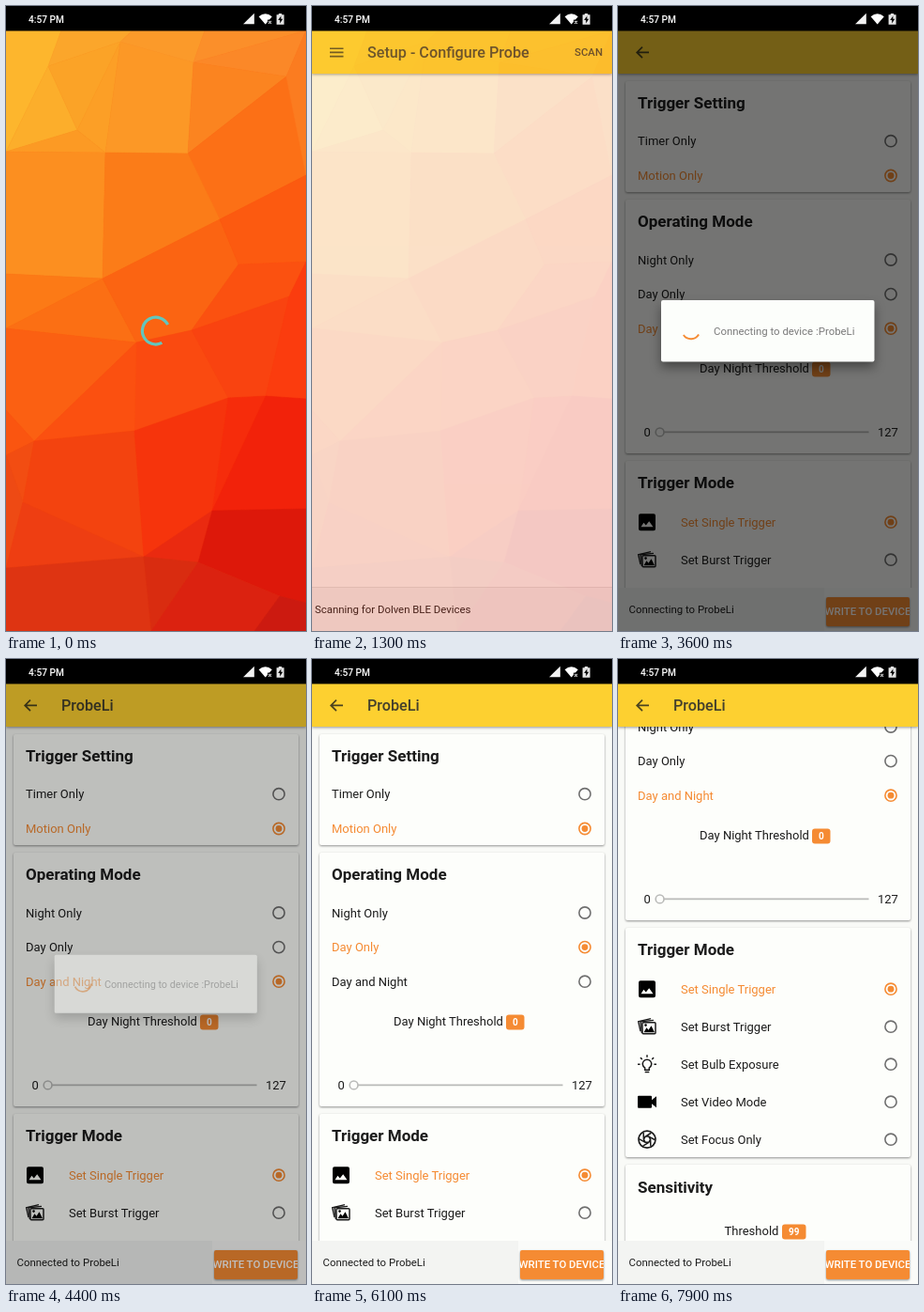
An HTML page that plays this animation: 320x665 px, repeating every 8 s.

```html
<!DOCTYPE html>
<html lang="en">
<head>
<meta charset="utf-8">
<title>Device setup</title>
<style>
  html, body { margin: 0; width: 100%; height: 100%; overflow: hidden; background: #000; }
  svg { display: block; width: 320px; height: 665px; }
  text { font-family: Roboto, "Noto Sans", sans-serif; white-space: pre; }
  .card { fill: #fdfefb; filter: drop-shadow(0 1px 1.2px rgba(0, 0, 0, .42)); }
  .bar { fill: #fdd030; filter: drop-shadow(0 1px 1.5px rgba(0, 0, 0, .4)); }
  .row { color: #6f6f6f; }
  .row text { fill: #1c1c1c; }
  .row.on { color: #f58b33; }
  .row.on text { fill: #f58b33; }
  .row .dot { display: none; }
  .row.on .dot { display: inline; }
  #box { filter: drop-shadow(0 6px 6px rgba(0, 0, 0, .4)); }
</style>
</head>
<body>
<svg id="stage" viewBox="0 0 320 665" xmlns="http://www.w3.org/2000/svg"></svg>
<script>
const LOOP = 8000, FRAME = 100;
const ORANGE = '#f58b33', INK = '#1c1c1c', DIM = '#4b431f';
const MAKER = 'Dolven', KIT = 'Probe', DEVICE = 'ProbeLi';

// ---- drawing helpers ----
const text = (x, y, s, size = 13, o = {}) =>
  `<text x="${x}" y="${y + size * .355}" font-size="${size}" font-weight="${o.w || 400}" ` +
  `fill="${o.fill || INK}" text-anchor="${o.anchor || 'start'}" id="${o.id || ''}">${s}</text>`;
const rect = (x, y, w, h, fill, extra = '') =>
  `<rect x="${x}" y="${y}" width="${w}" height="${h}" fill="${fill}" ${extra}/>`;
const path = (d, extra = '') => `<path d="${d}" ${extra}/>`;
const line = (d, color, w) => path(d, `fill="none" stroke="${color}" stroke-width="${w}"`);
const card = (y, h) => `<rect class="card" x="8" y="${y}" width="304" height="${h}" rx="2"/>`;
const heading = (y, s) => text(21, y, s, 17, { w: 700 });
const chip = (x, y, w, s) => rect(x, y - 8, w, 16, ORANGE, 'rx="3"') +
  text(x + w / 2, y, s, 10, { w: 700, fill: '#fff', anchor: 'middle' });
const row = (y, s, o = {}) => `<g class="row ${o.on ? 'on' : ''}" id="${o.id || ''}">` +
  `<text x="${o.x || 21}" y="${y + 4.6}" font-size="13">${s}</text>` +
  `<circle cx="291" cy="${y}" r="6.1" fill="none" stroke="currentColor" stroke-width="1.6"/>` +
  `<circle class="dot" cx="291" cy="${y}" r="3.4" fill="currentColor"/></g>`;
const icon = (y, s) => `<g transform="translate(31 ${y})">${s}</g>`;
const polar = (r, deg) => {
  const a = deg * Math.PI / 180;
  return `${(r * Math.cos(a)).toFixed(2)} ${(r * Math.sin(a)).toFixed(2)}`;
};
const arc = (r, from, sweep) =>
  `M${polar(r, from)}A${r} ${r} 0 ${sweep > 180 ? 1 : 0} 1 ${polar(r, from + Math.max(sweep, .5))}`;

// ---- faceted backdrop ----
const points = {
  a: [0, 26], R: [59, 26], b: [45, 64], c: [122, 38], d: [135, 26], e: [200, 60], f: [212, 26],
  g: [320, 26], h: [299, 75], i: [0, 155], j: [76, 132], k: [106, 156], l: [194, 157], m: [320, 180],
  n: [228, 227], o: [103, 290], p: [0, 285], q: [248, 275], r: [0, 343], s: [139, 358], t: [198, 345],
  u: [302, 309], v: [320, 272], w: [237, 417], x: [277, 415], y: [320, 418], z: [137, 452],
  A: [30, 463], B: [0, 430], C: [18, 528], D: [147, 586], E: [220, 537], G: [0, 598], H: [155, 665],
  I: [205, 592], J: [292, 628], K: [0, 665], L: [320, 665], M: [0, 478], N: [265, 665],
  O: [320, 535], Q: [320, 635]
};
const facets = ('aRbi:fdb62d bji:fcae2b Rdcb:fba62b bcj:fba327 cjk:fc9f26 ijk:fc9a24 celk:fc9826 ' +
  'dfec:fb9a2a fge:fb8f2a egh:fb8828 ehl:fb8420 hmnl:fc7016 ghm:fb7c20 ikop:fc8f20 klno:fb7c18 ' +
  'por:fc7a16 osr:fb6f14 onqts:fb6412 nmvq:fc5a10 qvut:fb5110 rsAB:fb6012 stwz:fa4a10 tuxw:f94310 ' +
  'uvyx:fb3c0e szA:fb5010 BAM:fa5510 MAC:f24d12 AzDC:f3430f zwED:f6340c wxE:f62c0b xyOE:f2220a ' +
  'MCG:ee4a14 CDG:ee3e12 GDHK:de3412 DEI:ea2a10 DIH:d92c10 EOQJI:dd180a IJNH:db2210 JQLN:cc1a10')
  .split(' ').map(f => {
    const [ids, hex] = f.split(':');
    const pts = [...ids].map(k => points[k].join()).join(' ');
    return `<polygon points="${pts}" fill="#${hex}" stroke="#${hex}" stroke-width=".6"/>`;
  }).join('');

// ---- icons ----
const photo = path('M-7 -9H7Q9 -9 9 -7V7Q9 9 7 9H-7Q-9 9 -9 7V-7Q-9 -9 -7 -9ZM-6.5 5H6.5L2.2 -1L-1.2 3.2L-3.6 .5Z',
  'fill-rule="evenodd"');
const burst =
  line('M-7 5L-9.3 -5.5L4 -8.6', INK, 1.4) + line('M-5.6 6.8L-7 -5.5L7 -6.8', INK, 1.4) +
  rect(-5, -4.5, 14, 12, '#fdfefb', `stroke="${INK}" stroke-width="1.5" rx="1"`) +
  path('M-3.5 6L-.5 1L1.5 3.5L4.5 -1L8 6Z') + '<circle cx="-1.5" cy="-1.6" r="1.3"/>';
const rays = [-180, -135, -90, -45, 0].map(a => `M${polar(7.4, a)}L${polar(10, a)}`).join('');
const bulb = line('M-2.3 6V3.8A4.7 4.7 0 1 1 2.3 3.8V6Z', INK, 1.5) +
  line('M-2.3 8.4H2.3' + rays, INK, 1.5);
const video = path('M-9 -6.5H4Q5 -6.5 5 -5.5V-2L10 -6V6L5 2V5.5Q5 6.5 4 6.5H-9Q-10 6.5 -10 5.5V-5.5Q-10 -6.5 -9 -6.5Z');
const blades = [0, 60, 120, 180, 240, 300].map(a => `M${polar(3.6, a)}L${polar(8.2, a + 62)}`).join('');
const hexagon = [0, 60, 120, 180, 240, 300].map((a, i) => (i ? 'L' : 'M') + polar(3.6, a)).join('') + 'Z';
const focus = `<circle r="9" fill="none" stroke="${INK}" stroke-width="1.7"/>` + line(blades + hexagon, INK, 1.5);

// ---- screens ----
const splash = facets + `<path id="loader" transform="translate(159.8 345.6)" fill="none" stroke="#62c6bd" stroke-width="3.2"/>`;

const header = '<rect class="bar" x="0" y="20" width="320" height="52"/>';

const home = `<g id="home">${rect(0, 26, 320, 840, '#fcfefb')}${header}
  ${line('M19 45.2H33.5M19 49.4H33.5M19 53.6H33.5', DIM, 1.6)}
  ${text(59, 49.5, `Setup - Configure ${KIT}`, 16.2, { w: 500, fill: '#44402c' })}
  ${text(280, 49, 'SCAN', 11.4, { w: 500, fill: '#44402c' })}
  <g id="item">${text(26, 100.5, DEVICE)}
  ${text(26, 115.5, 'DD:43:DD:80:BB:C0', 11.4, { fill: '#757575' })}
  ${text(26, 130.5, 'RSSI: -41', 11.4, { fill: '#757575' })}</g>
  <g clip-path="url(#itemClip)"><circle id="itemInk" cx="150" cy="116"/></g>
  ${rect(0, 618, 320, 240, '#f4f5f3')}${rect(0, 618, 320, .8, '#dfe0de')}
  ${text(3, 641.5, `Scanning for ${MAKER} BLE Devices`, 11.4)}</g>`;

const content = `
  ${card(80, 118)}${heading(102.5, 'Trigger Setting')}
  ${row(143.7, 'Timer Only')}${row(180.5, 'Motion Only', { on: true })}
  ${card(206, 270)}${heading(228.5, 'Operating Mode')}
  <g clip-path="url(#dayClip)"><circle id="dayInk" cx="160" cy="306"/></g>
  <g clip-path="url(#bothClip)"><circle id="bothInk" cx="160" cy="343"/></g>
  ${row(270, 'Night Only')}${row(306.6, 'Day Only', { id: 'day' })}
  ${row(343.2, 'Day and Night', { id: 'both' })}
  ${text(87, 385.5, 'Day Night Threshold')}${chip(207, 386.5, 19.5, '0')}
  ${text(27.5, 453.3, '0')}${text(277, 453.3, '127')}
  ${line('M49 453.4H267.5', '#b9bab8', 1.7)}
  <circle cx="44.6" cy="453.4" r="4.4" fill="#fdfefb" stroke="#b9bab8" stroke-width="1.6"/>
  ${card(484, 244)}${heading(506.5, 'Trigger Mode')}
  ${[['Set Single Trigger', photo], ['Set Burst Trigger', burst], ['Set Bulb Exposure', bulb],
    ['Set Video Mode', video], ['Set Focus Only', focus]].map(([s, pic], i) =>
    icon(549.2 + 40 * i, pic) + row(549.2 + 40 * i, s, { x: 67, on: !i })).join('')}
  ${card(736, 150)}${heading(759.5, 'Sensitivity')}
  ${text(113.5, 607, 'Threshold').replace(/y="[^"]+"/, 'y="811.4"')}${chip(175, 807.5, 25.5, '99')}`;

const detail = `<g id="detail">${rect(0, 26, 320, 840, '#f9faf7')}
  <g clip-path="url(#listClip)"><g id="list">${content}</g></g>${header}
  ${line('M33 49.4H20.5M26 43.6L20.2 49.4L26 55.2', DIM, 1.7)}
  ${text(59, 49.5, DEVICE, 16.2, { w: 500, fill: '#44402c', id: 'title' })}
  ${rect(0, 619, 320, 240, '#fafbf9')}${rect(0, 619, 220, 240, '#f3f4f2')}
  ${text(11.5, 641.5, '', 11.4, { id: 'state' })}
  <rect class="card" x="222" y="629" width="89" height="31" rx="2" style="fill:${ORANGE}"/>
  <g clip-path="url(#buttonClip)">${text(266.5, 644, 'WRITE TO DEVICE', 11.4, { w: 500, fill: '#fff', anchor: 'middle' })}</g></g>`;

const dialog = `<rect id="shade" y="26" width="320" height="639"/>
  <g id="dialog"><rect id="box" x="46" y="313" width="227.5" height="65.5" rx="2" fill="#fcfefb"/>
  <path id="wait" transform="translate(77.8 344.6)" fill="none" stroke="${ORANGE}" stroke-width="1.9"/>
  ${text(102, 345.7, `Connecting to device :${DEVICE}`, 11.4, { fill: '#7a7a7a' })}</g>`;

const status = `${rect(0, 0, 320, 26.5, '#000')}
  ${text(24, 14.3, '4:57 PM', 10.2, { w: 500, fill: '#fff' })}
  ${path('M253 19.3L264.8 7.8V19.3Z', 'fill="#f2f2f2"')}
  ${path('M269.6 11.2Q276.7 5.4 283.8 11.2L276.7 19.4Z', 'fill="#fff"')}
  <g id="weak">${rect(279, 14.6, 6, 6, '#000')}${line('M280 15.8L283 18.8M283 15.8L280 18.8', '#c9c9c9', 1.1)}</g>
  ${path('M288.6 9.2H290.8V8H294.2V9.2H296.6V19.8H288.6Z', 'fill="#e4e4e4"')}
  ${path('M293.4 10.4L290.2 15H292.2V18.6L295.2 13.8H293.3Z', 'fill="#000"')}`;

const clip = (id, x, y, w, h) => `<clipPath id="${id}">${rect(x, y, w, h, '#000')}</clipPath>`;
document.getElementById('stage').innerHTML = `<defs>
  ${clip('listClip', 0, 72, 320, 547)}${clip('itemClip', 0, 82, 320, 66)}
  ${clip('dayClip', 8, 288.5, 304, 36)}${clip('bothClip', 8, 325, 304, 36)}
  ${clip('buttonClip', 222, 629, 89, 31)}</defs>` +
  rect(0, 0, 320, 665, '#f0500f') + splash + home + detail + dialog + status;

// ---- motion ----
const $ = id => document.getElementById(id);
const set = (id, o) => { for (const k in o) $(id).setAttribute(k, o[k]); };
const show = (id, on) => $(id).setAttribute('visibility', on ? 'inherit' : 'hidden');
const clamp = v => Math.min(1, Math.max(0, v));
const at = (t, start, list) => list[Math.min(list.length - 1, Math.max(0, Math.floor((t - start) / FRAME) + 1))];

// cubic-bezier(.4, 0, .2, 1)
function swift(x) {
  let lo = 0, hi = 1;
  for (let i = 0; i < 20; i++) {
    const m = (lo + hi) / 2, n = 1 - m;
    if (1.2 * n * n * m + .6 * n * m * m + m * m * m < x) lo = m; else hi = m;
  }
  return 3 * (1 - lo) * lo * lo + lo * lo * lo;
}

function loaderArc(t) {
  const turns = t / 1333 + .5, step = Math.floor(turns), f = turns - step;
  const head = swift(clamp(f * 2)), tail = swift(clamp(f * 2 - 1));
  return arc(14.4, -90 + tail * 270 + f * 306 - step * 144, (head - tail) * 270);
}

function waitArc(t) {
  const u = (t - 3600) / 800;
  return arc(9.6, 30 + 335 * u, 116 + 34 * clamp(u) + 100 * Math.sin(Math.PI * clamp(u)));
}

function ink(id, t, start) {
  const u = (t - start + FRAME) / 400;
  const on = u > 0 && u < 1;
  set(id, { r: on ? 30 + 190 * u : 0, 'fill-opacity': on ? .13 * (1 - u * .6) : 0 });
}

// Each entry: opacity, vertical offset
const enter = [[0, 0], [.07, 90], [.28, 30], [.53, 8], [.77, 0], [.93, 0], [1, 0]];
const push = [[0, 0], [.1, 85], [.36, 28], [.66, 8], [.9, 1], [1, 0]];

function slide(id, [opacity, y]) {
  set(id, { opacity, transform: `translate(0 ${y})` });
  show(id, opacity > 0);
}

function draw(t) {
  show('loader', t < 1000);
  set('loader', { d: loaderArc(t) });
  slide('home', at(t, 1000, enter));
  show('item', t >= 2600);
  ink('itemInk', t, 2800);
  slide('detail', at(t, 3000, push));

  const opening = t < 4200;
  const shade = opening ? at(t, 3200, [0, .14, .32, .46, .54]) : at(t, 4300, [.54, .42, .25, 0]);
  const fade = opening ? at(t, 3200, [0, .25, .65, .92, 1]) : at(t, 4300, [1, .8, .42, 0]);
  const size = opening ? at(t, 3200, [.9, .93, .97, .99, 1]) : at(t, 4300, [1, .985, .95, .9]);
  set('shade', { 'fill-opacity': shade });
  set('dialog', { opacity: fade, transform: `translate(160 345.8) scale(${size}) translate(-160 -345.8)` });
  show('dialog', fade > 0);
  set('wait', { d: waitArc(t) });

  const linked = t >= 4300;
  show('title', linked);
  $('state').textContent = (linked ? 'Connected to ' : 'Connecting to ') + DEVICE;
  const dayOnly = t >= 4700 && t < 6500;
  $('day').classList.toggle('on', dayOnly);
  $('both').classList.toggle('on', !dayOnly);
  ink('dayInk', t, 4600);
  ink('bothInk', t, 6400);

  const u = clamp((t - 6700) / 900);
  set('list', { transform: `translate(0 ${-198 * (1 - (1 - u) ** 2)})` });
  show('weak', t < 2800 || t >= 3700);
}

const begin = performance.now();
function tick() {
  const t = (performance.now() - begin) % LOOP;
  draw(Math.floor(t / FRAME) * FRAME);
  requestAnimationFrame(tick);
}
tick();
</script>
</body>
</html>
```
